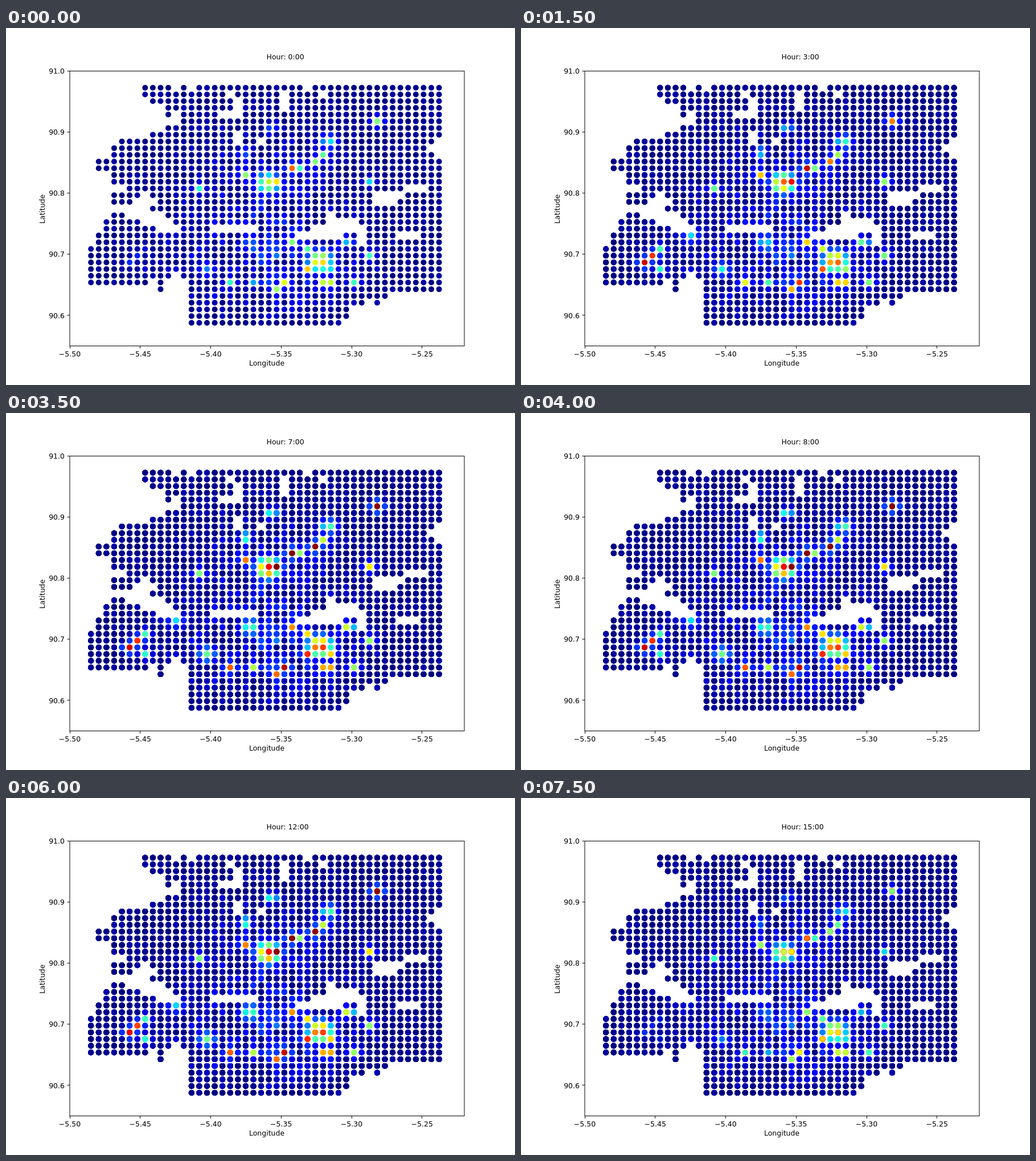
These frames come from a looping animation (894x626 px, 8000 ms). An HTML page with a canvas:

```html
<!DOCTYPE html>
<html lang="en">
<head>
<meta charset="utf-8">
<title>Hourly map</title>
<style>
  html, body { margin: 0; width: 100%; height: 100%; overflow: hidden; background: #fff; }
  canvas, svg { position: absolute; left: 0; top: 0; width: 894px; height: 626px; }
  text { font: 12.5px "DejaVu Sans", sans-serif; fill: #000; }
</style>
</head>
<body>
<canvas id="dots" width="894" height="626"></canvas>
<svg id="axes" viewBox="0 0 894 626">
  <rect x="112" y="75.5" width="693" height="482" fill="none" stroke="#000"/>
  <text id="title" x="457.5" y="55"></text>
  <text x="458" y="592" text-anchor="middle">Longitude</text>
  <text transform="translate(67.5 317.5) rotate(-90)" text-anchor="middle">Latitude</text>
</svg>
<script>
const HOUR_MS = 500, HOURS = 16, COLS = 46, ROWS = 36, RADIUS = 5;
const ctx = document.getElementById('dots').getContext('2d');
const axes = document.getElementById('axes');
const title = document.getElementById('title');

// Land in grid units; even-odd filling turns the inner shapes into gaps
const coast = 'M6.5-.5H45.5V7.5h-1v1h-1v1h1v1h1V30.5h-7v1h-3v1h-2v2h-1v1H12.5V28.5h-1v-1h-1v1h-3v1' +
  'H-.5V23.5h1v-2h1v-2h1v-1h2v1h2v1h2v1h3v-1h-1v-1h-1v-1h-2v-1h1v-1h-1v-1h-1v1h-1v1h-3v-2h2v-1h-2' +
  'v-2h-2v-2h2v-2h1v-1h4v-1h2v-1h2v-1h-2v-2h-2v-1h-1z';
const bays = 'M30.5 18.5h1v1h3v1h1v1h-3v1h-6v-1h2v-1h2z M40.5 14.5h3v1h-3v1h-1v1h-3v-2h4z' +
  'M15.5 20.5h6v1h-6z M39.5 21.5h3v1h-3z M34.5 21.5h1v2h-1z';
const notches = 'M10.5-.5h1v1h-1z M12.5-.5h1v1h-1z M27.5-.5h1v1h-1z M17.5 .5h1v1h-1z M29.5 .5h1v1h-1z' +
  'M24.5 .5h1v3h-1z M18.5 1.5h1v2h-1z M16.5 3.5h3v1h-3z M10.5 3.5h1v1h-1z M18.5 6.5h1v2h-1z M21.5 7.5h1v1h-1z';
const islets = 'M8.5 28.5h1v2h-1z M36.5 31.5h1v1h-1z';
const land = new Path2D(coast + bays + notches + islets);

// Hot places as column, row, peak and optional spread.
// Each group idles at a quiet level and takes some hours to rise.
const groups = [
  { quiet: .66, rise: 6, spots: [
    [22.9, 14.2, .92, 1.1], [24, 14, 1], [20, 13, .78],
    [25, 29, .95], [24, 30, .8], [26, 23, .76], [28, 24, .67]
  ] },
  { quiet: .8, rise: 6, spots: [
    [26, 12, 1], [27, 12, .52], [30, 10, .58], [30.7, 8, .46, .8], [14, 15, .5],
    [29.6, 25.8, .92, 1.1], [28, 27, .87], [30.5, 29, 1.1], [36, 25, .52], [34, 29, .53]
  ] },
  { quiet: .5, rise: 8, spots: [
    [37, 5, 1], [29, 11, 1], [36, 14, .67], [33.3, 23, .7], [18, 29, .82], [31, 26.7, .8],
    [21, 29, .57], [15, 27, .48, .8], [20, 9.6, .5], [23.4, 6, .48], [20.6, 23, .46, .9]
  ] },
  { quiet: .18, rise: 3, spots: [
    [5, 26, .93], [6, 25, .86], [7, 24, .43], [7, 27, .4], [11, 22, .34, .8]
  ] }
];

const clamp = v => Math.max(0, Math.min(1, v));
const ease = v => Math.sin(clamp(v) * Math.PI / 2);
const bell = (dx, dy, spread) => Math.exp(-(dx * dx + dy * dy) / (2 * spread * spread));

function hash(a, b) {
  const s = Math.sin(a * 127.1 + b * 311.7) * 43758.5453;
  return s - Math.floor(s);
}

function jet(v) {
  v = clamp(v);
  const r = Math.min((v - .35) / .31, v < .89 ? 1 : 1 - (v - .89) / .22);
  const g = Math.min((v - .125) / .25, (.91 - v) / .27);
  const b = Math.min(.5 + v / .22, (.65 - v) / .31);
  return `rgb(${[r, g, b].map(c => Math.round(255 * clamp(c)))})`;
}

// Rises from midnight, holds, and falls back by 15:00
function activity({ quiet, rise }, hour) {
  return quiet + (1 - quiet) * Math.min(ease(hour / rise), ease((15 - hour) / 3.5));
}

function background(col, row) {
  const town = .12 * bell(col - 22, row - 14, 6) + .2 * bell((col - 23) / 1.6, row - 26, 4.5);
  return (.035 + town) * hash(col, row) ** 2;
}

const cells = [];
for (let row = 0; row < ROWS; row++) {
  for (let col = 0; col < COLS; col++) {
    if (!ctx.isPointInPath(land, col, row, 'evenodd')) continue;
    const heats = groups.map(({ spots }) => Math.max(...spots.map(
      ([x, y, peak, spread = .55]) => peak * bell(col - x, row - y, spread))));
    cells.push({
      x: 149.2 + col * 13.587, y: 104.7 + row * 11.78, base: background(col, row), heats
    });
  }
}

function plotHour(hour) {
  const levels = groups.map(group => activity(group, hour));
  for (const { x, y, base, heats } of cells) {
    ctx.fillStyle = jet(Math.max(base, ...heats.map((heat, i) => heat * levels[i])));
    ctx.beginPath();
    ctx.arc(x, y, RADIUS, 0, 2 * Math.PI);
    ctx.fill();
  }
}

function addSvg(tag, attrs, text = '') {
  const el = document.createElementNS('http://www.w3.org/2000/svg', tag);
  for (const name in attrs) el.setAttribute(name, attrs[name]);
  el.textContent = text;
  axes.append(el);
}

for (let i = 0; i < 6; i++) {
  const x = 112 + i * 123.75;
  addSvg('path', { d: `M${Math.round(x - .5) + .5} 557.5v4.5`, stroke: '#000' });
  addSvg('text', { x, y: 576, 'text-anchor': 'middle' }, '\u2212' + (5.5 - i * .05).toFixed(2));
}
for (let i = 0; i < 5; i++) {
  const y = 75.5 + i * 107.1;
  addSvg('path', { d: `M112 ${Math.round(y - .5) + .5}h-4.5`, stroke: '#000' });
  addSvg('text', { x: 103, y: Math.round(y + 4.7), 'text-anchor': 'end' }, (91 - i * .1).toFixed(1));
}

let shown = -1;
function render(ms) {
  const hour = Math.floor(ms / HOUR_MS) % HOURS;
  if (hour === shown) return;
  shown = hour;
  title.textContent = `Hour: ${hour}:00`;
  // Each hour is plotted over the earlier ones, leaving thin rims
  ctx.clearRect(0, 0, 894, 626);
  for (let h = 0; h <= hour; h++) plotHour(h);
}

const start = performance.now();
function tick() {
  render(performance.now() - start);
  requestAnimationFrame(tick);
}
tick();
</script>
</body>
</html>
```
